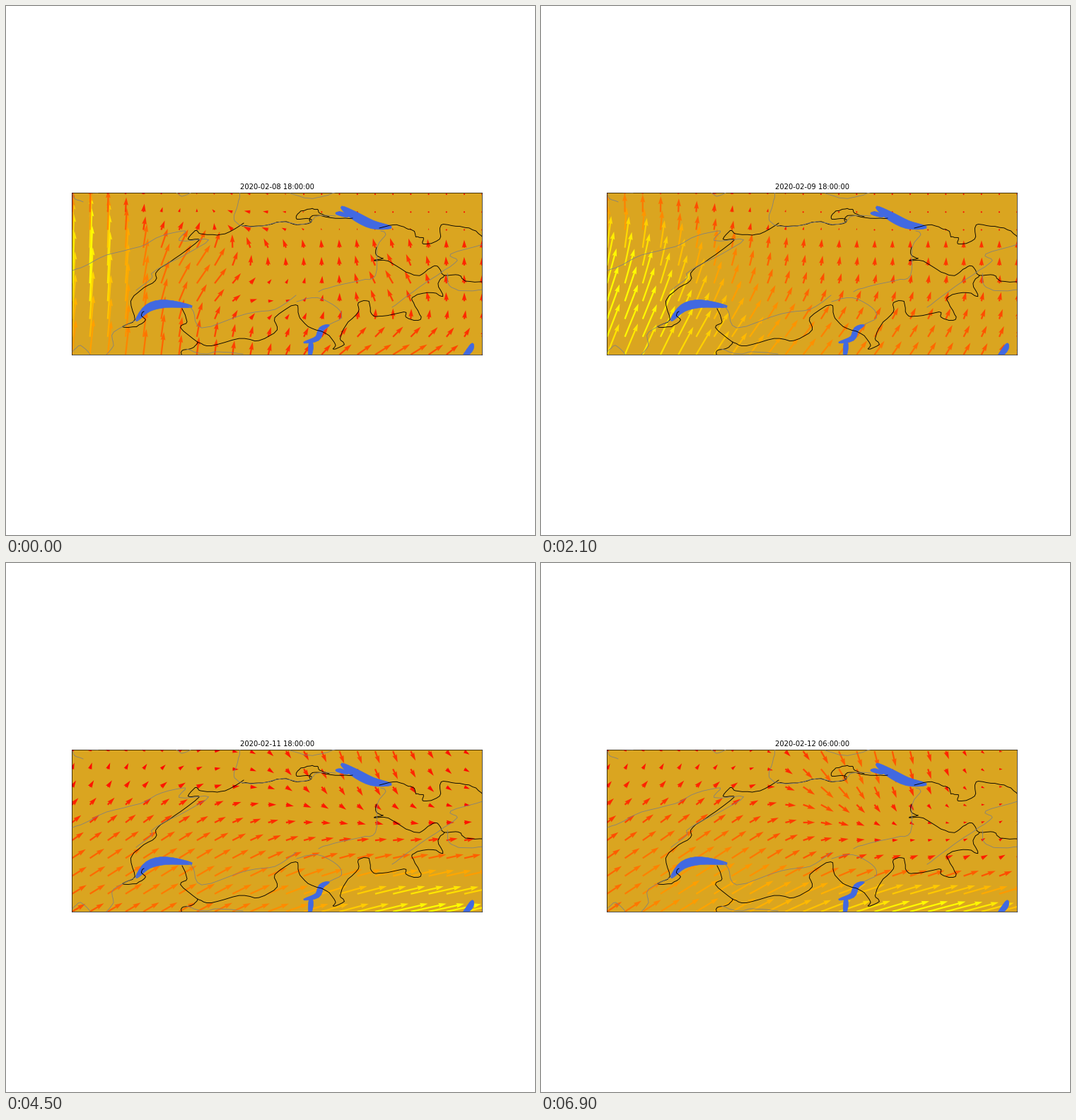
Recreate the animation shown at these times as a matplotlib script. Size 748 px wide and 748 px high, loop 7.2 s.

```python
import math

import numpy as np
import matplotlib.pyplot as plt
from matplotlib.animation import FuncAnimation

SIZE, DPI = 748, 64
PT = 72 / DPI                      # points per pixel
LEFT, RIGHT, TOP, BOTTOM = 93.4, 673.2, 263.6, 493.0
COLS, ROWS = 24, 10
STEP = (RIGHT - LEFT) / (COLS - 1)
MEAN_LEN = (RIGHT - LEFT) / (1.8 * math.sqrt(COLS * ROWS))

# ---------------------------------------------------------------- stage
fig = plt.figure(figsize=(SIZE / DPI, SIZE / DPI), dpi=DPI, facecolor="white")
ax = fig.add_axes([LEFT / SIZE, 1 - BOTTOM / SIZE,
                   (RIGHT - LEFT) / SIZE, (BOTTOM - TOP) / SIZE])
ax.set(xlim=(LEFT, RIGHT), ylim=(BOTTOM, TOP), xticks=[], yticks=[],
       facecolor="goldenrod")
for spine in ax.spines.values():
    spine.set_linewidth(0.67 * PT)
title = ax.set_title("", fontsize=10 * PT, pad=5 * PT, family="DejaVu Sans")

# ---------------------------------------------------------------- map
rng = np.random.default_rng(4)


def curve(pts, rough=0.0):
    """Smooth curve through a few points, roughened by seeded noise."""
    p = np.array([pts[0], *pts, pts[-1]], float)
    t = np.linspace(0, 1, 5)[:-1, None]
    parts = []
    for a, b, c, d in zip(p, p[1:], p[2:], p[3:]):
        parts.append(b + 0.5 * t * (c - a + t * (2 * a - 5 * b + 4 * c - d
                                    + t * (3 * (b - c) + d - a))))
    line = np.vstack([*parts, p[-1:]])
    line[1:-1] += rng.uniform(-rough, rough, line[1:-1].shape)
    return line


def border(*pts):
    ax.plot(*curve(pts, 0.6).T, color="black", lw=0.9 * PT, zorder=3)


def river(*pts):
    ax.plot(*curve(pts, 0.5).T, color="gray", lw=0.8 * PT, zorder=4)


def lake(width, *pts):
    """Ribbon along a curve that tapers towards both ends."""
    mid = curve(pts)
    way = np.gradient(mid, axis=0)
    normal = way[:, ::-1] * (1, -1) / np.hypot(*way.T)[:, None]
    taper = np.sin(np.linspace(0.15, math.pi - 0.15, len(mid)))[:, None]
    side = normal * taper ** 0.8 * width / 2
    ax.fill(*np.vstack([mid + side, (mid - side)[::-1]]).T,
            color="royalblue", lw=0.6 * PT, zorder=2.5)


lake(12, (184, 445), (201, 427), (226, 421), (263, 425))
lake(13, (474, 284), (492, 296), (518, 309), (545, 313))
lake(6, (466, 293), (474, 294), (484, 298))
lake(8, (457, 451), (446, 457), (440, 470), (421, 476))
lake(7, (431, 472), (431, 483), (429, 500))
lake(8, (660, 477), (656, 486), (644, 500))

# west
border((195, 432), (191, 437), (197, 444), (184, 453), (165, 453), (182, 443),
       (176, 418), (190, 402), (211, 388), (214, 374), (238, 358), (273, 331),
       (257, 330), (268, 317), (275, 322), (288, 323), (310, 322), (336, 307))
# north
border((334, 311), (362, 311), (390, 305), (412, 309), (430, 306), (430, 301),
       (411, 301), (414, 292), (430, 287), (440, 288), (444, 293), (457, 298))
border((430, 306), (430, 299), (440, 296), (466, 300), (490, 300))
border((528, 314), (548, 309), (566, 314), (577, 319), (580, 326), (590, 328),
       (590, 337), (613, 330), (615, 310), (636, 311), (660, 316), (674, 327))
# east
border((524, 341), (523, 352), (533, 357), (520, 360), (540, 361), (566, 376),
       (585, 381), (597, 372), (610, 368), (620, 381), (640, 380), (650, 389),
       (674, 390))
# south
border((620, 381), (611, 392), (618, 411), (603, 405), (577, 410), (576, 420),
       (587, 440), (580, 445), (566, 440), (563, 433), (532, 439), (517, 436),
       (513, 418), (498, 420), (498, 433), (480, 452), (473, 470), (478, 479),
       (463, 485), (466, 478), (452, 463), (427, 453), (414, 438), (410, 422),
       (380, 441), (383, 458), (358, 473), (330, 470), (290, 480), (271, 475),
       (247, 455), (256, 446), (249, 428))
border((271, 475), (265, 483), (249, 487), (249, 495))

river((94, 374), (110, 368), (142, 352), (190, 340), (220, 325), (254, 318),
      (245, 332), (287, 331), (243, 357), (208, 376), (206, 385), (184, 402))
river((94, 266), (97, 272), (109, 277))
river((107, 263), (130, 264))
river((331, 263), (328, 281), (322, 300), (334, 311), (362, 311), (390, 305),
      (412, 309), (430, 306), (440, 297), (466, 297))
river((530, 318), (537, 323), (525, 341), (523, 381), (500, 388), (455, 399),
      (442, 404))
river((411, 418), (440, 412), (468, 427), (474, 441), (456, 451))
river((410, 409), (380, 429), (340, 435), (277, 455), (265, 432), (258, 424))
river((546, 426), (575, 404), (620, 374), (638, 360), (629, 351), (674, 337))
river((624, 378), (627, 395), (645, 403), (674, 401))
river((240, 263), (249, 269), (263, 263))
river((402, 265), (428, 272), (450, 269), (470, 262))
river((188, 442), (152, 461), (152, 480), (140, 495))
river((94, 489), (105, 480), (119, 493))
river((255, 485), (280, 492), (300, 489), (335, 492))

# ---------------------------------------------------------------- wind
gx, gy = np.meshgrid(np.arange(COLS), np.arange(ROWS))   # gy grows northwards


def blow(base, *gusts):
    """Sum of a base wind (u + vj) and gusts (x, y, x-reach, y-reach, wind)."""
    total = np.zeros(gx.shape) + base
    for x, y, rx, ry, w in gusts:
        total += w * np.exp(-((gx - x) / rx) ** 2 - ((gy - y) / ry) ** 2)
    return total


# gentle southerly that dies out in the north, and its bends in the valleys
breeze = 11j / (1 + np.exp(4 * (gy - 6.6)))
valleys = blow(breeze,
               (7, 5, 2.5, 2.5, 18 + 10j),
               (9.5, 7, 3, 2, -12),
               (10.5, 3, 3, 1.5, 6 - 14j),
               (18, 4, 2, 2, -10 + 6j),
               (18, 0, 5, 1.5, 22 + 2j))

# six-hour step -> wind
WINDS = {
    1: blow(valleys,
            (0, 1, 4.5, 6, -4 + 32j),
            (3, 7.5, 7, 3, -18 + 8j),
            (6, 0.5, 3, 1.5, -14),
            (16, 9, 5, 2.5, -1 - 20j)),
    3: blow(valleys,
            (0, 0, 8, 6, 5 + 25j),
            (1, 5, 2.5, 4, 50j)),
    7: blow(breeze,
            (0, 3, 7, 7, 16 + 36j),
            (7, 0, 6, 4, 10 + 5j),
            (15, 0, 10, 3, 12 + 7j),
            (0, 8, 6, 4, -10 + 5j)),
    10: blow(6 + 2j,
             (3, 1, 9, 5, 22 + 15j),
             (19, 0, 9, 3.2, 46 + 2j)),
    16: blow(8 + 3j,
             (5, 2, 10, 4, 14 + 11j),
             (20, 0, 8, 3, 38 + 8j),
             (1, 9, 5, 4, -8 + 6j),
             (16, 9, 6, 4, -2 - 24j)),
    17: blow(4 + 4j,
             (5, 1, 8, 5, 22 + 13j),
             (18, 0, 8, 2, 42 + 8j),
             (3, 9, 8, 3, -3 + 2j),
             (15, 9, 5.5, 4, -24j),
             (12, 7, 2.5, 2.5, 10 - 6j)),
    23: blow(breeze,
             (1, 3, 8, 5, 40 + 12j),
             (13, 0, 8, 2.5, 26 - 5j),
             (5, 9, 5, 3, -2 + 8j)),
}
KNOWN = sorted(WINDS)


def wind_at(step):
    """Blend the two nearest winds and scale to the mean arrow length."""
    n = min(max(np.searchsorted(KNOWN, step), 1), len(KNOWN) - 1)
    a, b = KNOWN[n - 1], KNOWN[n]
    t = (step - a) / (b - a)
    w = WINDS[a] * (1 - t) + WINDS[b] * t
    return w * MEAN_LEN / np.abs(w).mean()


w = wind_at(3)
arrows = ax.quiver(LEFT + STEP * gx, BOTTOM - STEP * gy, w.real, w.imag,
                   np.abs(w), cmap="autumn", scale=1, scale_units="x",
                   angles="uv", zorder=1)

# six-hour steps in the shuffled order in which they are shown
ORDER = [3, 12, 5, 10, 20, 0, 14, 7, 18, 2, 9, 21,
         13, 1, 6, 15, 22, 23, 4, 11, 16, 19, 8, 17]


def update(frame):
    step = ORDER[frame]
    w = wind_at(step)
    speed = np.abs(w)
    arrows.set_UVC(w.real, w.imag, speed)
    arrows.set_clim(speed.min(), speed.max())
    title.set_text(f"2020-02-{8 + step // 4:02d} {step % 4 * 6:02d}:00:00")
    return arrows, title


anim = FuncAnimation(fig, update, frames=len(ORDER), interval=300,
                     repeat=True, repeat_delay=0, blit=False)
plt.show()
```
